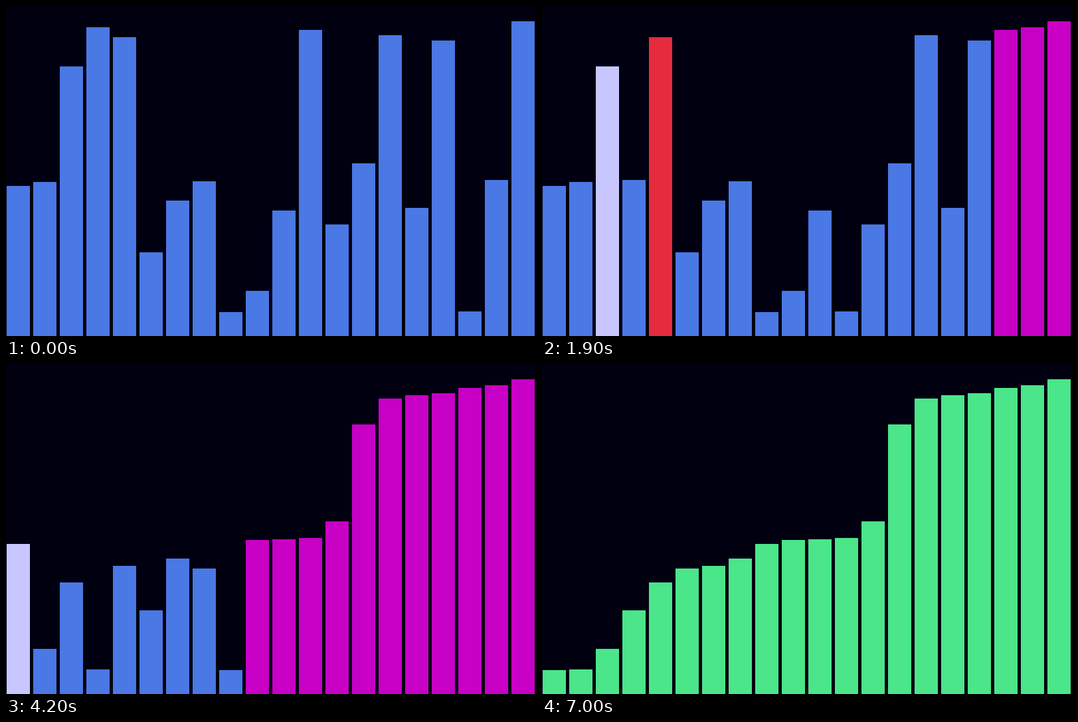
Recreate the animation shown at these times as an HTML page. Size 798 by 497 pixels, loop 7200 ms.

```html
<!DOCTYPE html>
<html lang="en">
<head>
<meta charset="utf-8">
<title>Selection sort</title>
<style>
html, body { margin: 0; width: 100%; height: 100%; overflow: hidden; background: #000011; }
svg { display: block; }
</style>
</head>
<body>
<svg id="stage" width="798" height="497" viewBox="0 0 798 497" shape-rendering="crispEdges"></svg>
<script>
const LOOP = 7200, TICK = 100, FLOOR = 497;
const BLUE = '#4a78e4', LILAC = '#c8c6ff', RED = '#e52b3d', PURPLE = '#c800c6', GREEN = '#4be58a';
const START = 500, SCAN = 577, LEAD = 88, STEP = 17;
const CHECK = 5597, CHECK_STEP = 27;
const tops = [271, 265, 91, 32, 47, 371, 293, 264, 461, 429,
  308, 36, 329, 237, 44, 304, 52, 460, 262, 23];
const count = tops.length;

const stage = document.getElementById('stage');
const bars = tops.map((_, i) => {
  const bar = document.createElementNS('http://www.w3.org/2000/svg', 'rect');
  bar.setAttribute('x', 1 + 40 * i);
  bar.setAttribute('width', 35);
  return stage.appendChild(bar);
});

// Index of the tallest bar among 0..last
function tallest(list, last) {
  let best = 0;
  for (let j = 1; j <= last; j++) if (list[j] < list[best]) best = j;
  return best;
}

function sortState(t) {
  const list = tops.slice();
  const fills = Array(count).fill(BLUE);
  if (t < START) return { list, fills };

  let left = Math.max(0, t - SCAN);
  let end = count - 1;
  for (; end > 0; end--) {
    const span = LEAD + end * STEP;
    if (left < span) break;
    left -= span;
    const best = tallest(list, end);
    [list[best], list[end]] = [list[end], list[best]];
    fills[end] = PURPLE;
  }

  if (t >= CHECK) {
    const at = Math.floor((t - CHECK) / CHECK_STEP);
    return { list, fills: fills.map((_, i) => i < at ? GREEN : i === at ? PURPLE : BLUE) };
  }
  if (end === 0) {
    fills[0] = PURPLE;
    return { list, fills };
  }

  const steps = (left - LEAD) / STEP;
  if (steps < 0) {
    fills[0] = LILAC;
  } else {
    // The probe lights up first, then the comparison takes effect
    const probe = Math.floor(steps) + 1;
    const lit = steps % 1 < 0.5;
    if (lit) fills[probe] = RED;
    fills[tallest(list, lit ? probe - 1 : probe)] = LILAC;
  }
  return { list, fills };
}

function draw(t) {
  const { list, fills } = sortState(t);
  bars.forEach((bar, i) => {
    bar.setAttribute('y', list[i]);
    bar.setAttribute('height', FLOOR - list[i]);
    bar.setAttribute('fill', fills[i]);
  });
}

function frame() {
  const t = performance.now() % LOOP;
  draw(Math.floor(t / TICK) * TICK);
  requestAnimationFrame(frame);
}
frame();
</script>
</body>
</html>
```
